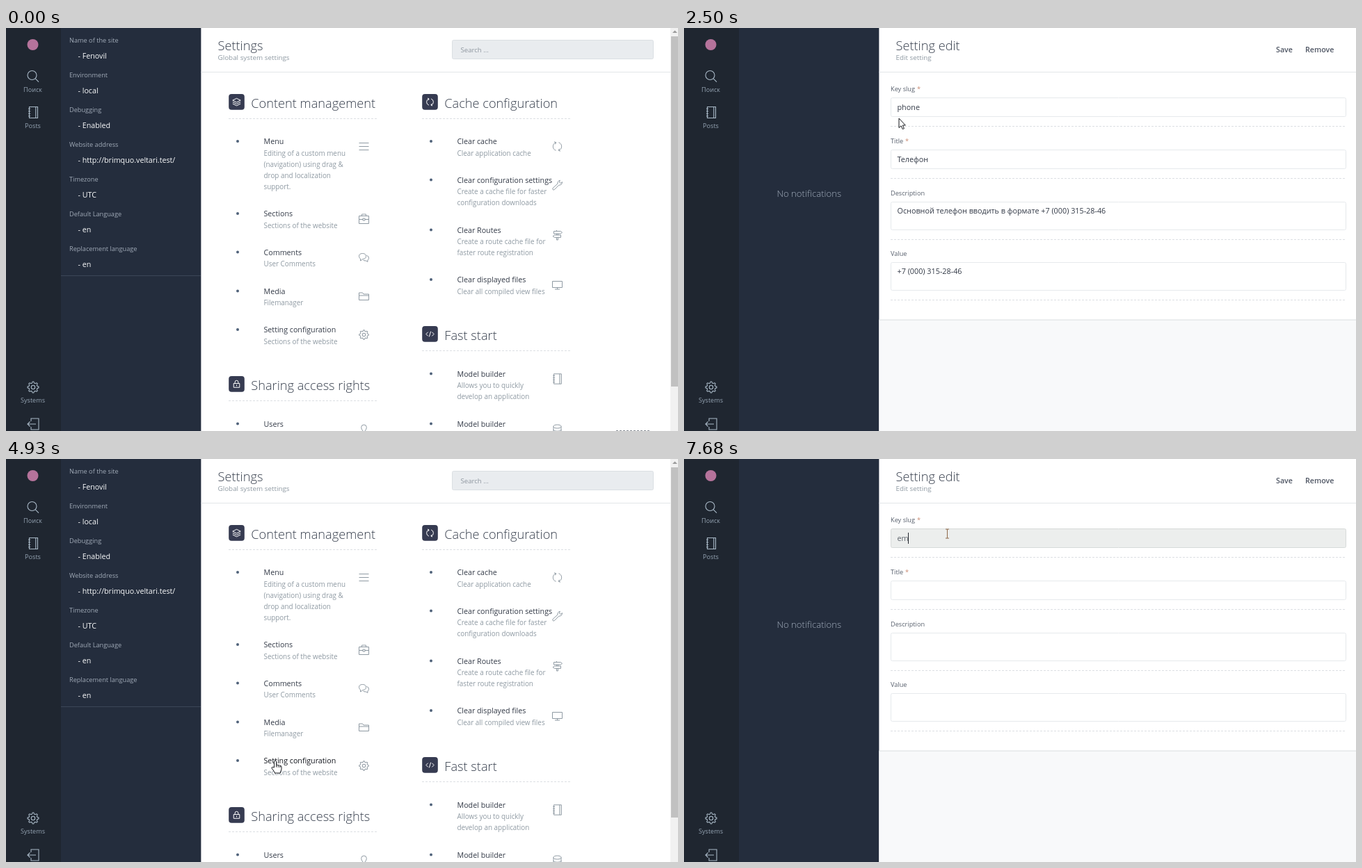
Animation of 966x580 px, one loop 8 s. Source, as an HTML page with a canvas:

```html
<!DOCTYPE html>
<html lang="en">
<head>
<meta charset="utf-8">
<title>Settings panel</title>
<style>
  html, body { margin: 0; width: 100%; height: 100%; overflow: hidden; background: #fff; }
  canvas { display: block; width: 966px; height: 580px; }
</style>
</head>
<body>
<canvas id="stage" width="966" height="580"></canvas>
<script>
const ctx = document.getElementById('stage').getContext('2d');
const LOOP = 8000;
const FACE = '"Open Sans", "Noto Sans", sans-serif';
const PHONE = '+7 (000) 315-28-46';
const INK = '#333a47', MUTED = '#8f9aa3', TITLE = '#39414f', LINE = '#e6e9ec';
const DARK = '#1f2630', PANEL = '#242d3d';
const EDGE = 280.35;   // right side of the panel

let mouse = null;      // current pointer position
let pointer = 'arrow'; // shape chosen while the page is drawn

// ---------- basic drawing ----------

function rect(x, y, w, h, color) {
  ctx.fillStyle = color;
  ctx.fillRect(x, y, w, h);
}

function box(x, y, w, h, r, fill, stroke) {
  ctx.beginPath();
  ctx.roundRect(x, y, w, h, r);
  ctx.fillStyle = fill;
  ctx.fill();
  if (!stroke) return;
  ctx.strokeStyle = stroke;
  ctx.lineWidth = 1;
  ctx.stroke();
}

function dot(x, y, r, color) {
  ctx.beginPath();
  ctx.arc(x, y, r, 0, Math.PI * 2);
  ctx.fillStyle = color;
  ctx.fill();
}

// y is the middle of the capitals
function text(str, x, y, size, color, weight = 400, align = 'left') {
  ctx.font = `${weight} ${size}px ${FACE}`;
  ctx.textAlign = align;
  ctx.fillStyle = color;
  ctx.fillText(str, x, Math.round(y + size * 0.36));
}

function dashes(x1, x2, y, color = '#dcdfe3') {
  ctx.beginPath();
  ctx.setLineDash([3, 2]);
  ctx.moveTo(x1, y);
  ctx.lineTo(x2, y);
  ctx.strokeStyle = color;
  ctx.lineWidth = 1;
  ctx.stroke();
  ctx.setLineDash([]);
}

function over(x, y, w, h) {
  return mouse && mouse.x >= x && mouse.x < x + w && mouse.y >= y && mouse.y < y + h;
}

function link(x, y, w, h) {
  const hit = over(x, y, w, h);
  if (hit) pointer = 'hand';
  return hit;
}

// ---------- icons, centred on 0,0 ----------

function gearPath() {
  let d = '';
  for (let i = 0; i < 32; i++) {
    const a = (i - 0.5) * Math.PI / 16;
    const r = i % 4 < 2 ? 8 : 6.1;
    d += `${i ? 'L' : 'M'}${r * Math.cos(a)} ${r * Math.sin(a)}`;
  }
  return d + 'ZM2.7 0A2.7 2.7 0 1 1 -2.7 0A2.7 2.7 0 1 1 2.7 0Z';
}

const ICONS = {
  search: 'M5 -1.5A6.5 6.5 0 1 1 -8 -1.5A6.5 6.5 0 1 1 5 -1.5M3 3.2L8 8.2',
  book: 'M-5.5 -8H6.5V8H-5.5ZM3.8 -8V8M-7 -5.2H-3.8M-7 -1.7H-3.8M-7 1.7H-3.8M-7 5.2H-3.8',
  gear: gearPath(),
  exit: 'M-3 -4V-8H8V8H-3V4M4 0H-8M-4.5 -3.5L-8 0L-4.5 3.5',
  menu: 'M-7 -5H7M-7 0H7M-7 5H7',
  case: 'M-7 -4H7V7H-7ZM-3 -4V-6.5H3V-4M-7 1H-1.5M1.5 1H7M-1.5 -.5H1.5V2.5H-1.5Z',
  chat: 'M-2 3L-5 5V2Q-7 1 -7 -1.5Q-7 -5.5 -2 -5.5Q3 -5.5 3 -1.5Q3 2.5 -2 2.5M4 -2.5Q7 -2 7 1.2Q7 3 5.4 4V6.5L3 5Q0 5.2 -1 4',
  folder: 'M-7 5.5V-5H-2L-.5 -3H7V5.5ZM-7 -1H7',
  user: 'M-1.5 3Q-4 0 -3.8 -2.5Q-3.4 -6 0 -6Q3.4 -6 3.8 -2.5Q4 0 1.5 3V5L6 8M-1.5 3V5L-6 8',
  cycle: 'M-2 5.7A6 6 0 0 1 -2 -5.7M-4.4 -6.8L-1.8 -5.7L-3 -3.2M2 -5.7A6 6 0 0 1 2 5.7M4.4 6.8L1.8 5.7L3 3.2',
  wrench: 'M-6.5 4.5L.5 -2Q0 -5.5 3.8 -6.8L3 -3.8L4.8 -2.6L7 -4.4Q7 .2 2.2 .2L-4.4 6.8Q-6 7.4 -6.7 6.2Z',
  sign: 'M-1 -7V-5.5M-5 -5.5H5L7 -3.7L5 -2H-5ZM5 0H-4L-6.5 1.7L-4 3.4H5ZM-1 -2V0M1 -2V0M-1 3.4V7H1V3.4',
  screen: 'M-7 -5H7V4H-7ZM0 4V6.5M-3.5 6.5H3.5',
  data: 'M-5.5 -3.5Q-5.5 -6 0 -6T5.5 -3.5T0 -1T-5.5 -3.5V7M5.5 -3.5V7M-5.5 1Q-5.5 3.2 0 3.2T5.5 1',
  layers: 'M0 -5.5L6 -2.6L0 .4L-6 -2.6ZM-6 0L0 3L6 0M-6 2.6L0 5.6L6 2.6',
  lock: 'M-4.5 -1H4.5V5H-4.5ZM-2.5 -1V-3Q-2.5 -5.5 0 -5.5T2.5 -3V-1M0 1V3',
  code: 'M-3 -3L-6 0L-3 3M3 -3L6 0L3 3M1.2 -4L-1.2 4'
};
const paths = {};
for (const name in ICONS) paths[name] = new Path2D(ICONS[name]);

const HAND = new Path2D('M-1.5 10V1.2Q-1.5 0 0 0T1.5 1.2V6.5Q3 5.3 4.2 6.8Q5.8 5.8 6.8 7.6Q9 7 9 9V12Q9 14 7.5 16V18H-1V16.5L-5 11Q-5.2 9 -3.3 9.4Z');
const KNUCKLES = new Path2D('M1.5 6.5V9.5M4.2 7V9.8M6.8 7.8V10');
const ARROW = new Path2D('M0 0V13.6L3.1 10.8L5.3 15.6L7.4 14.6L5.3 10H9.3Z');
const BEAM = new Path2D('M-2.5 -6.5H2.5M0 -6.5V6.5M-2.5 6.5H2.5');

function icon(name, x, y, color = MUTED, scale = 1, width = 1) {
  ctx.save();
  ctx.translate(x, y);
  ctx.scale(scale, scale);
  ctx.strokeStyle = color;
  ctx.lineWidth = width / scale;
  ctx.stroke(paths[name]);
  ctx.restore();
}

function drawPointer() {
  ctx.save();
  ctx.translate(mouse.x, mouse.y);
  ctx.lineWidth = 1;
  ctx.lineJoin = 'round';
  if (pointer === 'beam') {
    ctx.translate(0.5, 0.5);
    ctx.strokeStyle = '#8f6a4c';
    ctx.stroke(BEAM);
  } else {
    const shape = pointer === 'hand' ? HAND : ARROW;
    ctx.fillStyle = '#fff';
    ctx.strokeStyle = '#16181d';
    ctx.fill(shape);
    ctx.stroke(shape);
    if (pointer === 'hand') ctx.stroke(KNUCKLES);
  }
  ctx.restore();
}

// ---------- shared parts ----------

function navItem(name, label, y, top) {
  const hot = link(0, top, 79, 53);
  if (hot) rect(0, top, 79, 53, '#343b49');
  icon(name, 39, y, hot ? '#fff' : '#a9b9c7', 1, 1.1);
  text(label, 38.5, y + 19, 9.1, hot ? '#e9edf2' : '#94a3b2', 400, 'center');
}

function nav() {
  rect(0, 0, 79, 580, DARK);
  rect(79, 0, EDGE - 79, 580, PANEL);
  dot(38.5, 24, 8, '#b5739b');
  navItem('search', 'Поиск', 69.5, 48);
  navItem('book', 'Posts', 121.5, 101);
  navItem('gear', 'Systems', 517, 498);
  navItem('exit', '', 570, 551);
}

function header(title, note) {
  text(title, 304.5, 25, 18.2, TITLE, 300);
  text(note, 304.5, 42.5, 9.85, MUTED);
  rect(EDGE, 63, 966 - EDGE, 1, '#e2e6e9');
}

function backdrop(y) {
  rect(EDGE, y, 966 - EDGE, 580 - y, '#f8f9fa');
  rect(EDGE, y - 0.5, 966 - EDGE, 1.2, '#dfe3e6');
}

function action(label, x) {
  ctx.font = `600 10.7px ${FACE}`;
  const w = ctx.measureText(label).width;
  const hot = link(x, 23, w, 16);
  const color = hot ? '#22262e' : '#4e5563';
  text(label, x, 31, 10.7, color, 600);
  if (hot) rect(x, 36, w, 1, color);
}

function emptyPanel() {
  text('No notifications', 179.8, 238.5, 13.2, '#a3aebd', 300, 'center');
}

// ---------- settings page ----------

const FACTS = [
  ['Name of the site', 'Fenovil'], ['Environment', 'local'], ['Debugging', 'Enabled'],
  ['Website address', 'http://brimquo.veltari.test/'], ['Timezone', 'UTC'],
  ['Default Language', 'en'], ['Replacement language', 'en']
];

const LEFT = [
  ['menu', 163.5, 'Menu', 'Editing of a custom menu', '(navigation) using drag &', 'drop and localization', 'support.'],
  ['case', 267.5, 'Sections', 'Sections of the website'],
  ['chat', 323, 'Comments', 'User Comments'],
  ['folder', 379, 'Media', 'Filemanager'],
  ['gear', 434.5, 'Setting configuration', 'Sections of the website'],
  ['user', 570, 'Users']
];

const RIGHT = [
  ['cycle', 163.5, 'Clear cache', 'Clear application cache'],
  ['wrench', 219, 'Clear configuration settings', 'Create a cache file for faster', 'configuration downloads'],
  ['sign', 291, 'Clear Routes', 'Create a route cache file for', 'faster route registration'],
  ['screen', 362.5, 'Clear displayed files', 'Clear all compiled view files'],
  ['book', 498, 'Model builder', 'Allows you to quickly', 'develop an application'],
  ['data', 570, 'Model builder']
];

function section(name, title, x, y) {
  box(x + 0.2, y - 12.9, 22.6, 22.6, 4, '#363b51');
  icon(name, x + 11.5, y - 1.5, '#fff', name === 'cycle' ? 0.8 : 0.95);
  text(title, x + 32.3, y, 18.2, TITLE, 300);
  dashes(x, x + 214, y + 22.5);
}

function entry([name, y, title, ...lines], x) {
  dot(x + 13, y - 0.5, 2, '#50627a');
  ctx.font = `400 10.7px ${FACE}`;
  const hot = link(x + 50, y - 6, ctx.measureText(title).width, 13);
  text(title, x + 50.5, y, 10.7, hot ? '#12151c' : INK);
  lines.forEach((s, i) => text(s, x + 50.5, y + 16.5 + i * 16, 9.9, MUTED));
  icon(name, x + 194.5, y + 7, MUTED, name === 'gear' ? 0.85 : name === 'book' ? 0.9 : 1);
}

function settings(t) {
  FACTS.forEach(([label, value], i) => {
    text(label, 91, 17.5 + i * 50, 9.2, '#a0aab7');
    text('- ' + value, 103.5, 40.5 + i * 50, 10.7, '#fafbfc');
  });
  rect(79, 356, 201, 1, '#3c4657');

  header('Settings', 'Global system settings');
  box(641.5, 17.5, 289, 27, 2, '#e9ecef', '#dbdfe3');
  text('Search ...', 653.5, 31.5, 9.6, '#8e969f');

  section('layers', 'Content management', 320, 108);
  section('lock', 'Sharing access rights', 320, 514);
  section('cycle', 'Cache configuration', 598, 108);
  section('code', 'Fast start', 598, 442);
  for (const e of LEFT) entry(e, 320);
  for (const e of RIGHT) entry(e, 598);

  rect(955, 0, 11, 580, '#f1f1f1');
  rect(956, 12, 10, 504, '#c1c1c1');
  ctx.fillStyle = '#9a9a9a';
  ctx.fill(new Path2D('M958 7L961.5 3.5L965 7Z'));
  if (t < 100) dashes(877, 927, 579.5, '#8a8f96');
}

// ---------- list page ----------

function list() {
  emptyPanel();
  backdrop(213);
  header('Setting List', 'List all settings');
  action('Create a new setting', 830);
  for (const y of [104, 152, 164]) rect(EDGE, y, 966 - EDGE, 1, '#eceef0');

  text('Key', 294.5, 86, 10, '#b3b7bc');
  text('Name', 457.5, 86, 10, '#b3b7bc');
  text('Value', 653.5, 86, 10, '#b3b7bc');
  const hot = link(296, 122, 32, 16);
  text('phone', 296.5, 129.5, 10.4, hot ? '#12151c' : INK);
  if (hot) rect(297, 135, 31, 1, '#12151c');
  text('Телефон', 461, 129, 10.3, '#5a616d');
  text(PHONE, 658, 129, 10.65, '#5a616d');
  text('show 1 -1 of 1 elements', 294, 190, 10, MUTED);
}

// ---------- edit page ----------

const FIELDS = [
  ['Key slug', 100, 28, 'phone'],
  ['Title', 175, 28, 'Телефон'],
  ['Description', 250, 41, 'Основной телефон вводить в формате ' + PHONE],
  ['Value', 337, 41, PHONE]
];

function edit(t, fresh) {
  emptyPanel();
  backdrop(420);
  header('Setting edit', 'Edit setting');
  action('Save', 851);
  action('Remove', 893);

  FIELDS.forEach(([label, y, h, value], i) => {
    text(label, 297, y - 12, 9.2, '#575f6c');
    if (i < 2) text('*', i ? 318 : 335, y - 12, 9.2, '#c98a72');
    const focus = fresh && i === 0;
    box(297.5, y + 0.5, 654, h - 1, 2, focus ? '#eceeed' : '#fff', focus ? '#d6dad9' : LINE);
    if (over(297, y, 655, h)) pointer = 'beam';
    const str = focus ? 'em' : fresh ? '' : value;
    text(str, 306.5, i < 2 ? y + 14.5 : y + 13.5, 10.8, focus ? '#5d636b' : INK);
    dashes(297, 952, y + h + 13.5);
  });
  if (fresh && (t < 7230 || t >= 7680)) rect(322, 106, 1, 16, '#22262e');
}

// ---------- timeline ----------

// [first step, last step, steps, from x, from y, to x, to y]
const MOVES = [
  [100, 870, 8, 610, 610, 446, 438],
  [1080, 1080, 1, 444, 438, 444, 438],
  [1300, 1830, 6, 444, 438, 309, 130],
  [2720, 3500, 8, 309, 130, 405, 112],
  [3600, 3940, 4, 405, 112, 57, 526],
  [4160, 4160, 1, 440, 160, 440, 160],
  [4390, 4930, 6, 440, 160, 387, 434],
  [5480, 6230, 8, 387, 434, 862, 52],
  [6350, 6570, 3, 862, 52, 874, 32],
  [6700, 6700, 1, 378, 107, 378, 107]
];

function mouseAt(t) {
  const move = MOVES.filter(m => m[0] <= t).pop();
  if (!move) return null;
  const [a, b, n, x0, y0, x1, y1] = move;
  const gap = n > 1 ? (b - a) / (n - 1) : 1;
  const k = Math.min(n, Math.floor((t - a) / gap + 1e-6) + 1);
  const p = k / n;
  const e = p * p * (3 - 2 * p);
  return { x: Math.round(x0 + (x1 - x0) * e), y: Math.round(y0 + (y1 - y0) * e) };
}

function draw(t) {
  mouse = mouseAt(t);
  pointer = 'arrow';
  rect(0, 0, 966, 580, '#fff');
  nav();
  if (t < 1080 || (t >= 4060 && t < 5480)) settings(t);
  else if (t < 2500 || (t >= 5480 && t < 6700)) list();
  else edit(t, t >= 6700);
  if (mouse) drawPointer();
}

const start = performance.now();
function tick() {
  draw((performance.now() - start) % LOOP);
  requestAnimationFrame(tick);
}
tick();
</script>
</body>
</html>
```
